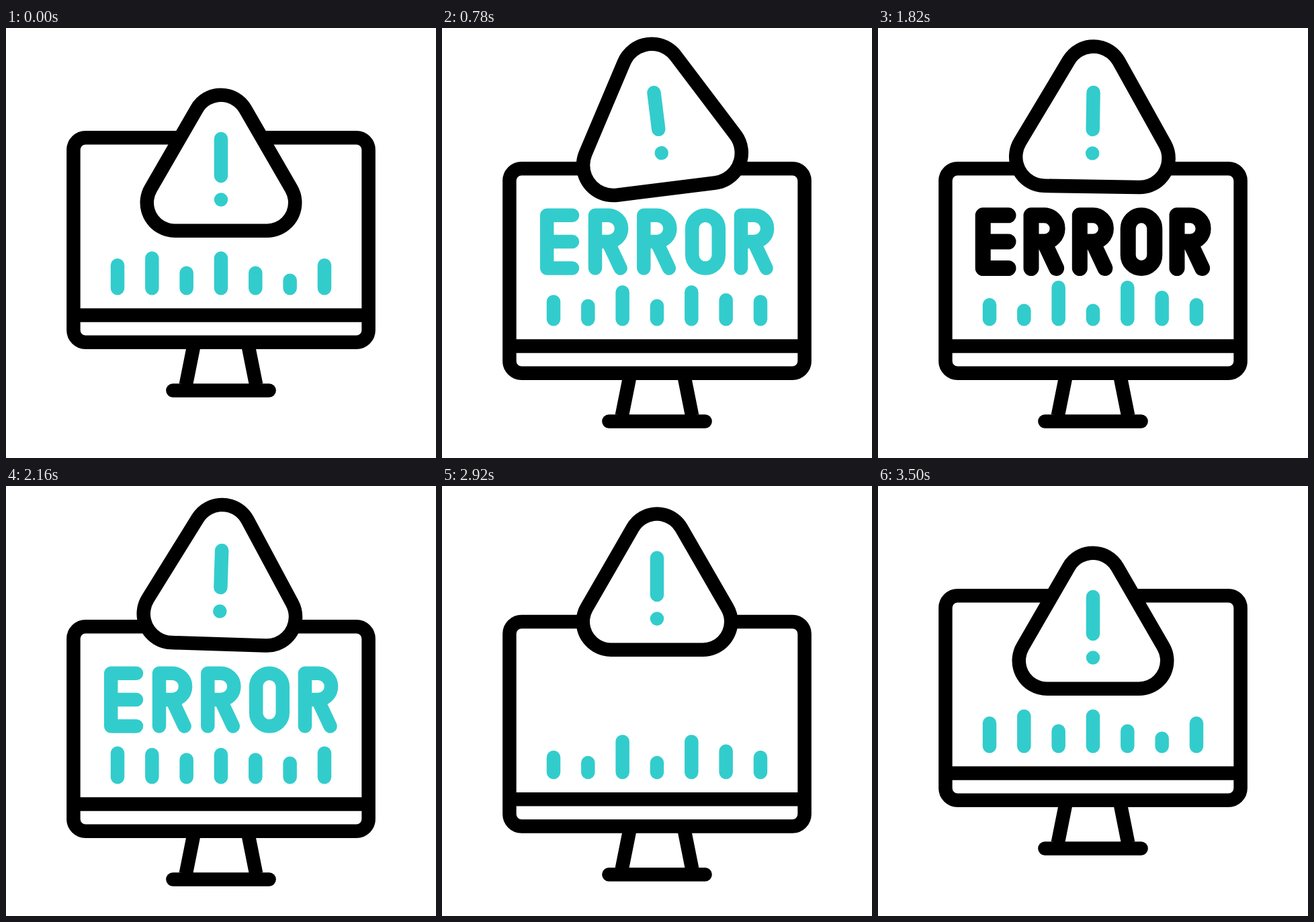
Animation, 640 px wide and 640 px high, one loop 3600 ms. Source, as an HTML page:

```html
<!DOCTYPE html>
<html lang="en">
<head>
<meta charset="utf-8">
<title>Error alert</title>
<style>
  html, body { margin: 0; width: 100%; height: 100%; overflow: hidden; background: #fff; }
  svg { display: block; width: 100vw; height: 100vh; }
  .line { fill: none; stroke: #000; stroke-width: 20.5; stroke-linecap: round; stroke-linejoin: round; }
  .teal { stroke: #3cc; }
  .butt { stroke-linecap: butt; }
  .tri { stroke-linejoin: round; }
</style>
</head>
<body>
<svg viewBox="0 0 640 640">
  <defs>
    <path id="r" d="M228 357.5V278.8H247.5A19.6 19.6 0 0 1 247.5 318H228M247 318L265.6 357.5"/>
    <path id="tri" d="M-68.5 39.5H68.5L0 -79.1Z"/>
  </defs>
  <g id="monitor">
    <rect class="line" x="100.4" y="163.3" width="439.2" height="304.4" rx="18"/>
    <path class="line butt" d="M100 427.5H540M279.6 472L267.8 531M360.4 472L372.2 531"/>
    <path class="line" d="M248.4 539.5H391.6"/>
    <g id="bars"></g>
  </g>
  <g id="word" class="line teal" role="img" aria-label="ERROR">
    <path d="M194 278.8H156.2V357.5H194M156.2 318H194"/>
    <use href="#r"/>
    <use href="#r" x="72.3"/>
    <rect x="372.2" y="278.8" width="39.6" height="78.7" rx="19.8"/>
    <use href="#r" x="217"/>
  </g>
  <g id="sign">
    <use id="rim" class="tri" href="#tri" stroke="#000"/>
    <use id="face" class="tri" href="#tri" fill="#fff" stroke="#fff"/>
  </g>
  <path id="mark" class="line teal" d="M320 96V151M320 186.5h.01"/>
</svg>
<script>
const LOOP = 3600, DROP = 46, RISE = 69, STROKE = 20.5, CORNER = 41.75;
const $ = id => document.getElementById(id);
const ease = p => p * p * (3 - 2 * p);

// Interpolates rows of [time, values] with an ease on each segment.
function sample(keys, t) {
  const i = keys.findIndex(k => k[0] > t);
  if (i < 0) return keys[keys.length - 1][1];
  const [t0, a] = keys[i - 1], [t1, b] = keys[i];
  const p = ease((t - t0) / (t1 - t0));
  return a.map((v, n) => v + (b[n] - v) * p);
}

// Sign pose: angle, scale, centre x, centre y
const rest = [0, 1, 320, 151.5];
const right = [6.8, 1, 317.2, 151.4];
const left = [-7.2, 1.075, 322.7, 153];
const wobble = [rest, right, left, right, left, right, left, rest].map((v, i) => [i * 400, v]);

const open = [[0, [0]], [400, [1]], [2800, [1]], [3280, [0]]];

// Bar heights by group
const start = [54.5, 65, 43, 32];
const high = [64, 65.2, 35, 35];
const low = [41.4, 32.9, 67.6, 52.6];
const levels = [start, low, high, low, high, low].map((v, i) => [i * 600, v]);
levels.push([3500, start]);

const bars = [0, 1, 2, 1, 2, 3, 0].map((group, i) => {
  const el = document.createElementNS("http://www.w3.org/2000/svg", "path");
  el.setAttribute("class", "line teal");
  $("bars").append(el);
  return { el, group, x: 166 + i * 51.33 };
});

function draw(t) {
  const [k] = sample(open, t);
  const lift = RISE * (1 - k);
  $("monitor").setAttribute("transform", `translate(0 ${DROP * k})`);

  const heights = sample(levels, t);
  for (const { el, group, x } of bars)
    el.setAttribute("d", `M${x} 387.3v${STROKE - heights[group]}`);

  const [angle, scale, cx, cy] = sample(wobble, t);
  $("sign").setAttribute("transform", `translate(${cx} ${cy + lift}) rotate(${angle}) scale(${scale})`);
  $("rim").setAttribute("stroke-width", (2 * CORNER * scale + STROKE) / scale);
  $("face").setAttribute("stroke-width", (2 * CORNER * scale - STROKE) / scale);
  $("mark").setAttribute("transform", `translate(0 ${lift}) rotate(${angle} 320 132.5)`);

  const dark = t % 800 < 400;
  const word = $("word").style;
  word.display = t >= 400 && t < 2800 ? "" : "none";
  word.stroke = dark ? "#000" : "#3cc";
  word.strokeWidth = dark ? 23 : STROKE;
}

const begin = performance.now();
function tick() {
  draw((performance.now() - begin) % LOOP);
  requestAnimationFrame(tick);
}
tick();
</script>
</body>
</html>
```
